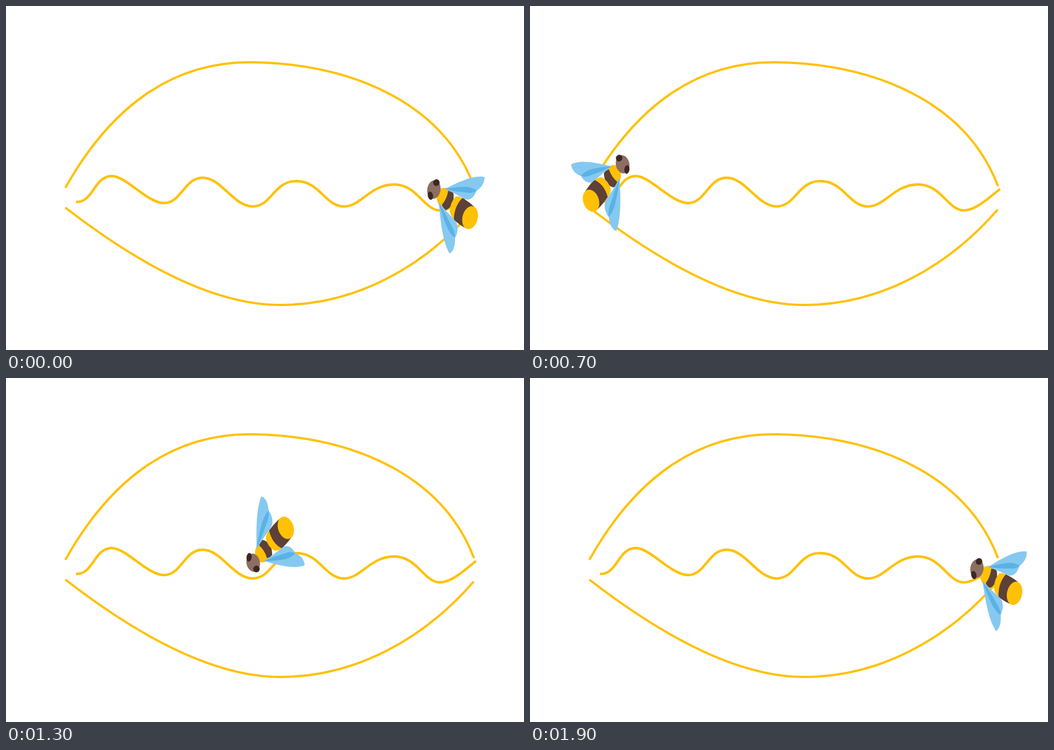
Write an HTML page that moves like this. It is 917 by 611 pixels and loops after 2000 ms.

```html
<!DOCTYPE html>
<html lang="en">
<head>
<meta charset="utf-8">
<title>Bee</title>
<style>
  html, body { margin: 0; width: 100%; height: 100%; overflow: hidden; background: #fff; }
  svg { display: block; width: 100%; height: 100%; }
</style>
</head>
<body>
<svg viewBox="0 0 917 611">
  <defs>
    <g id="wing">
      <path fill="#86c9f0" d="M-21 -10.5C-8 -27 8 -48 25 -57.5Q31 -61.5 32 -59Q36.500 -50 28.500 -37Q29 -29 26 -24Q22 -17.500 16 -17Q8 -15.500 -4 -14Z"/>
      <path fill="#5ab2e6" d="M-21 -10.500Q-6 -23 5 -29.500Q16 -37 28.200 -37.500Q25 -31 18.500 -28Q8 -23 -1 -18.500Z"/>
    </g>
  </defs>
  <g fill="none" stroke="#ffc107" stroke-width="4">
    <path d="M105 323C185 180 295 97 437 100C615 103 773 173 828.500 320"/>
    <path d="M105 358C230 455 365 531 485 531C620 531 740 463 828 361.500"/>
    <path stroke-width="4.400" d="M124 348C154 350 156 302 187 302C213 302 250 350 280 350C310 350 316 305 348 305C382 305 402 356 437 356C470 356 474 311 514 311C556 311 564 356 599 356C628 356 645 317 687 317C728 317 740 363 768 363C788 363 810 343 832 325"/>
  </g>
  <g id="bee">
    <ellipse cx="-14" rx="15.500" ry="13.800" fill="#ffc107"/>
    <path fill="#5d4037" d="M-14.500 -11.500Q-9 -15 -4.500 -13Q5.500 0 -4.500 13Q-10 14 -14.500 10.500Q-11 0 -14.500 -11.500Z"/>
    <path fill="#ffc107" d="M13 -16Q5 -15.500 1 -12Q-4 0 2 11Q6 15.500 15 17Z"/>
    <path fill="#5d4037" d="M12 -16Q23 -17.500 36 -16.500V16.500Q24 18 14 17Q5 1 12 -16Z"/>
    <ellipse cx="37.300" rx="13" ry="16.500" fill="#ffc107"/>
    <use href="#wing"/>
    <use href="#wing" transform="scale(1 -1)"/>
    <ellipse cx="-37.300" rx="11.500" ry="13" fill="#8d6e63"/>
    <g fill="#3e2723">
      <ellipse rx="5.800" ry="4.500" transform="translate(-38.300 -10.300) rotate(-35)"/>
      <ellipse rx="5.800" ry="4.500" transform="translate(-38.300 10.300) rotate(35)"/>
    </g>
  </g>
</svg>
<script>
const STEP = 100, LOOP = 2000, STRETCH = 1.31;
const bee = document.getElementById('bee');

// Poses: x, y, heading in degrees clockwise from left.
const weave = [
  [789.5, 351, 30.8], [715.5, 350, 30.4], [592, 333, -8], [466.5, 297, -39.3],
  [339, 341, 15.3], [234, 334, 22], [167, 333, -28]
];
const over = [[136, 313.5, 138.5], [410, 138, 172], [735, 215, 218]];
const under = [[173.5, 378.5, 209], [480, 519, 180], [824.5, 360.5, 26.7]];
const flight = [...weave, ...over, ...weave, ...under];

function draw(ms) {
  const [x, y, angle] = flight[Math.floor((ms % LOOP) / STEP)];
  bee.setAttribute('transform', `translate(${x} ${y}) scale(1 ${STRETCH}) rotate(${angle})`);
}

let start;
function tick(now) {
  start ??= now;
  draw(Math.max(0, now - start));
  requestAnimationFrame(tick);
}
draw(0);
requestAnimationFrame(tick);
</script>
</body>
</html>
```
